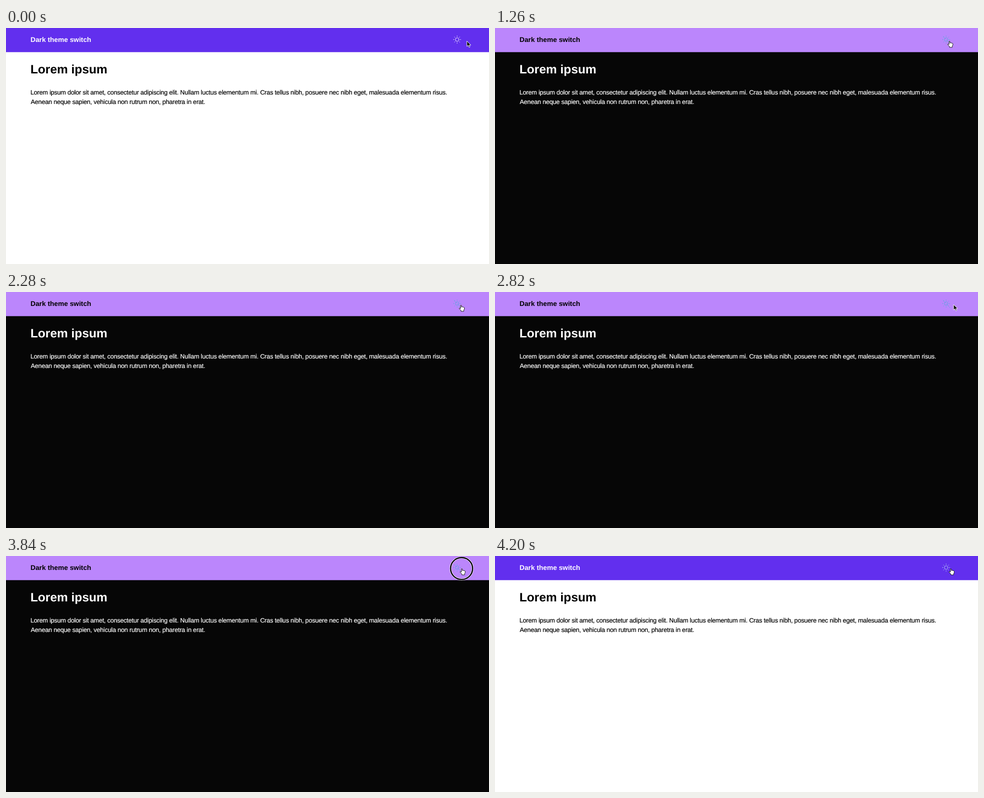
These frames come from a looping animation (1068x525 px, 4.26 s). An HTML page:

```html
<!DOCTYPE html>
<html lang="en">
<head>
<meta charset="utf-8">
<title>Dark theme switch</title>
<style>
html, body { margin: 0; width: 100%; height: 100%; overflow: hidden; }
svg { display: block; width: 1068px; height: 525px; }
text { font-family: "Liberation Sans", Arial, sans-serif; text-rendering: geometricPrecision; }
#stage { --page: #fff; --ink: #000; --bar: #622fee; --title: #fff; --sun: #fff; }
#stage.hover { --sun: #b9d5f3; }
#stage.dark { --page: #060606; --ink: #fff; --bar: #bb86fc; --title: #000; --sun: #55aadd; }
.page { fill: var(--page); }
.bar { fill: var(--bar); }
.bold { font-weight: bold; }
.title { fill: var(--title); }
.ink { fill: var(--ink); }
.body { font-size: 14px; letter-spacing: -.24px; stroke: var(--ink); stroke-width: .2px; }
#sun { fill: none; stroke: var(--sun); stroke-linecap: round; }
#streak { display: none; stroke-dasharray: 2 3; }
.dark #streak { display: inline; }
</style>
</head>
<body>
<svg id="stage" viewBox="0 0 1068 525">
  <rect class="page" width="1068" height="525"/>
  <rect class="bar" width="1068" height="53.7"/>
  <text class="bold title" x="54.2" y="30.5" font-size="15.2">Dark theme switch</text>
  <text class="bold ink" x="54" y="101" font-size="27.1">Lorem ipsum</text>
  <g class="ink body">
    <text x="54" y="148">Lorem ipsum dolor sit amet, consectetur adipiscing elit. Nullam luctus elementum mi. Cras tellus nibh, posuere nec nibh eget, malesuada elementum risus.</text>
    <text x="54.7" y="169">Aenean neque sapien, vehicula non rutrum non, pharetra in erat.</text>
  </g>
  <g id="sun" transform="translate(997.5 25.7)">
    <circle r="3.9"/>
    <path id="rays"/>
    <path id="streak" d="M-6-7L9 10"/>
  </g>
  <g id="ring" transform="translate(1007.4 27.8)" fill="none">
    <circle r="24.4" stroke="#fff" stroke-width="4.4" opacity=".8"/>
    <circle r="24.4" stroke="#000" stroke-width="2.6"/>
  </g>
  <g id="cursor" stroke-linejoin="round">
    <path id="arrow" fill="#111" stroke="#fff" d="M0 0V12L3 9.5L5 14L7 13L5 9H9Z"/>
    <path id="hand" fill="#fff" stroke="#111" d="M-1 8V1Q0-1 1 1V4.5Q2.5 3 4 4.5Q5 4 6 5Q8 5 7.5 8L6 12V14H0V12L-4 8Q-4 5-1 8Z"/>
  </g>
</svg>
<script>
const $ = id => document.getElementById(id);
const LOOP = 4260, STEP = 60;

// pointer key points: time, x, y
const path = [
  [0, 1019, 29], [180, 1021, 35], [660, 1005, 29],
  [2220, 1005, 29], [2580, 1012, 29], [2760, 1012, 29],
  [3000, 1020, 25], [3180, 1018, 24], [3840, 1008, 28], [LOOP, 1008, 28]
];

let d = "";
for (let i = 0; i < 8; i++) {
  const a = i * Math.PI / 4, c = Math.cos(a), s = Math.sin(a);
  d += `M${6.9 * c} ${6.9 * s}L${8.2 * c} ${8.2 * s}`;
}
$("rays").setAttribute("d", d);

const show = (id, on) => { $(id).style.display = on ? "inline" : "none"; };

function pointer(t) {
  const i = path.findIndex(p => p[0] > t);
  const [t0, x0, y0] = path[i - 1], [t1, x1, y1] = path[i];
  const k = (t - t0) / (t1 - t0);
  return [x0 + (x1 - x0) * k, y0 + (y1 - y0) * k];
}

function draw(now) {
  const t = Math.floor((now % LOOP) / STEP) * STEP;
  const [x, y] = pointer(t);
  const hover = x < 1011;
  $("stage").classList.toggle("dark", t >= 1260 && t < 3900);
  $("stage").classList.toggle("hover", hover);
  $("cursor").setAttribute("transform", `translate(${x} ${y})`);
  show("hand", hover);
  show("arrow", !hover);
  show("ring", t >= 3780 && t < 3900);
}

const start = performance.now();
function tick() {
  draw(performance.now() - start);
  requestAnimationFrame(tick);
}
tick();
</script>
</body>
</html>
```
